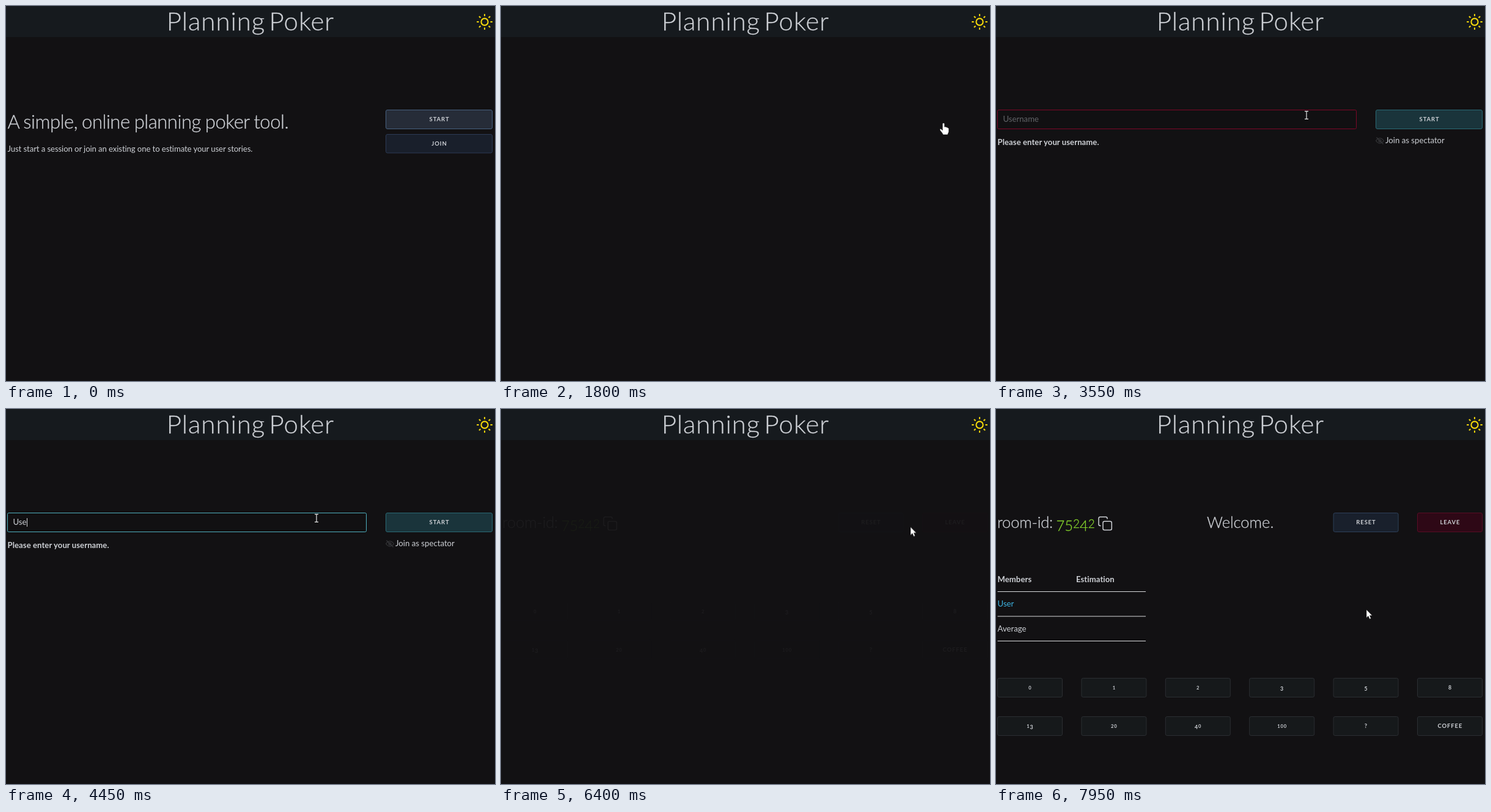
Animation, 800 px wide and 615 px high, one loop 8 s. Source, as an HTML page:

```html
<!DOCTYPE html>
<html lang="en">
<head>
<meta charset="utf-8">
<title>Planning Poker</title>
<style>
html, body { margin: 0; width: 100%; height: 100%; overflow: hidden; background: #121113; }
svg { display: block; width: 100vw; height: 100vh; }
text { font: 400 13.2px Lato, "Open Sans", sans-serif; fill: #cdd0d5; white-space: pre; }
.title, .lead, .sub { font-weight: 300; stroke: #cdd0d5; stroke-width: .3px; }
.title { font-size: 42px; letter-spacing: .95px; word-spacing: -6px; text-anchor: middle; }
.lead { font-size: 31px; letter-spacing: -.45px; word-spacing: -1px; }
.sub { font-size: 25.5px; }
.info { letter-spacing: -.11px; }
.bold { font-weight: 700; font-size: 13.1px; letter-spacing: .08px; }
.btn text { font-size: 9.5px; font-weight: 700; letter-spacing: .9px; text-anchor: middle; }
.line { fill: none; stroke: #cdd0d5; }

/* 1% of the loop is 80 ms */
.home, .form, .room, .shift, .cursor { animation: 8s linear infinite; }
.step, .caret, .field, .go, .go text, .join rect { animation: 8s step-end infinite; }

.home { animation-name: home; }
@keyframes home { 0%, 16.875% { opacity: 1 } 20%, 100% { opacity: 0 } }
.form { animation-name: form; }
@keyframes form { 0%, 22.5% { opacity: 0 } 28%, 73.75% { opacity: 1 } 76.875%, 100% { opacity: 0 } }
.room { animation-name: room; }
@keyframes room { 0%, 79.9% { opacity: 0 } 80% { opacity: .05 } 86%, 100% { opacity: 1 } }

.members { animation-name: members; }
@keyframes members { 0% { visibility: hidden } 81.5%, 100% { visibility: visible } }
.shift { animation-name: shift; animation-timing-function: step-end; }
@keyframes shift { 0% { transform: translateY(-125.5px) } 81.5%, 100% { transform: none } }

.join rect { animation-name: join; }
@keyframes join {
  0%, 15.5%, 100% { fill: #191f2b; stroke: #2c3a55 }
  13.1% { fill: #262c38; stroke: #46617f }
}
.go { animation-name: go; }
@keyframes go {
  0%, 70.8%, 100% { fill: #1d3c46; stroke: #43b4ca }
  38.125% { fill: #1a343b; stroke: #2a6a75 }
}
.go text { animation-name: goText; }
@keyframes goText { 0%, 70.8%, 100% { fill: #3db6d8 } 38.125% { fill: #cdd0d5 } }
.field { animation-name: field; }
@keyframes field { 0% { stroke: #7d0728 } 50%, 100% { stroke: #4fb0c0 } }

.hint { animation-name: hint; }
@keyframes hint { 0% { visibility: visible } 50%, 100% { visibility: hidden } }
.k1 { animation-name: k1; }
.k2 { animation-name: k2; }
.k3 { animation-name: k3; }
.k4 { animation-name: k4; }
@keyframes k1 { 0% { visibility: hidden } 50%, 100% { visibility: visible } }
@keyframes k2 { 0% { visibility: hidden } 53.125%, 100% { visibility: visible } }
@keyframes k3 { 0% { visibility: hidden } 55.625%, 100% { visibility: visible } }
@keyframes k4 { 0% { visibility: hidden } 57.5%, 100% { visibility: visible } }
.caret { animation-name: caret, blink; }
@keyframes caret {
  0% { transform: translateX(11px) }
  50% { transform: translateX(21px) }
  53.125% { transform: translateX(27px) }
  55.625% { transform: translateX(34px) }
  57.5%, 100% { transform: translateX(39px) }
}
@keyframes blink {
  0%, 44.375%, 63.75%, 73.125%, 100% { visibility: hidden }
  38.125%, 50%, 70% { visibility: visible }
}

.cursor { animation-name: move; }
@keyframes move {
  0% { transform: translate(700px, 625px) }
  .6% { transform: translate(700px, 608px); animation-timing-function: ease-out }
  10.625%, 11.875% { transform: translate(719px, 254px) }
  16.875%, 24.375% { transform: translate(724px, 192px) }
  31.875%, 33.125% { transform: translate(517px, 174px) }
  37.5%, 66.875% { transform: translate(508px, 179px) }
  72.5%, 91.25% { transform: translate(670px, 193.5px); animation-timing-function: ease-in-out }
  99.375%, 100% { transform: translate(606px, 329px) }
}
.arrow { animation-name: arrow; }
@keyframes arrow {
  0%, 15.4%, 28.1%, 69.7%, 80%, 100% { visibility: visible }
  13.1%, 16.1%, 29.2%, 70.8% { visibility: hidden }
}
.hand { animation-name: hand; }
@keyframes hand {
  0%, 15.4%, 28.1%, 80%, 100% { visibility: hidden }
  13.1%, 16.1%, 70.8% { visibility: visible }
}
.beam { animation-name: beam; }
@keyframes beam { 0%, 69.7%, 100% { visibility: hidden } 29.2% { visibility: visible } }
</style>
</head>
<body>
<svg viewBox="0 0 800 615" preserveAspectRatio="none">
  <rect width="800" height="615" fill="#121113"/>
  <rect width="800" height="51" fill="#161a1e"/>
  <text class="title" x="400" y="39.5">Planning Poker</text>
  <g id="sun" transform="translate(783 26)" fill="none" stroke="#f5d90a" stroke-width="2.1">
    <circle r="5.6"/>
  </g>

  <g class="home">
    <text class="lead" x="2.5" y="200.5">A simple, online planning poker tool.</text>
    <text class="info" x="2.5" y="239">Just start a session or join an existing one to estimate your user stories.</text>
    <g class="btn" fill="#262c38" stroke="#46617f">
      <rect x="621.5" y="170.5" width="174" height="31" rx="2.5"/>
      <text x="709" y="189.4" stroke="none">START</text>
    </g>
    <g class="btn join">
      <rect x="621.5" y="210.5" width="174" height="30.5" rx="2.5"/>
      <text x="709" y="229.2">JOIN</text>
    </g>
  </g>

  <g class="form">
    <rect class="field" x="2.5" y="170.5" width="587" height="31" rx="2" fill="#111012"/>
    <text class="step hint" x="11.4" y="190" style="fill:#626468">Username</text>
    <text x="11.4" y="190"><tspan class="step k1">U</tspan><tspan class="step k2">s</tspan><tspan class="step k3">e</tspan><tspan class="step k4">r</tspan></text>
    <rect class="caret" y="179" width="1" height="14" fill="#d8dade"/>
    <text class="bold" x="2.5" y="228">Please enter your username.</text>
    <g class="btn go">
      <rect x="621.5" y="170.5" width="174" height="31" rx="2.5"/>
      <text x="709" y="189.4" stroke="none">START</text>
    </g>
    <g fill="none" stroke="#37383b" stroke-width="1.1">
      <path d="M621.5 221Q628 212.5 634.5 221Q628 229.5 621.5 221ZM622.5 215.5L633.5 226.5"/>
      <circle cx="628" cy="221" r="2"/>
    </g>
    <text x="637" y="225">Join as spectator</text>
  </g>

  <g class="room">
    <text class="sub" x="2" y="195.3" letter-spacing="-.2">room-id:</text>
    <text class="sub" id="code" x="98.5" y="195.3" style="fill:#86d32c;stroke:#86d32c"></text>
    <g class="line" stroke-width="1.5">
      <rect x="175" y="184.3" width="14.3" height="14.3" rx="2.5"/>
      <path d="M171.5 191.5H170.5Q168 191.5 168 189V179.5Q168 177 170.5 177H179.5Q182 177 182 179.5V180.5"/>
    </g>
    <g id="top"></g>
    <g class="step members">
      <text class="sub" x="345" y="195.3">Welcome.</text>
      <text class="bold" x="2.5" y="283.7">Members</text>
      <text class="bold" x="131" y="283.7">Estimation</text>
      <text x="2.5" y="324.2" style="fill:#3db4e2">User</text>
      <text x="2.5" y="364.5">Average</text>
      <path d="M2.5 299.5H245M2.5 340H245M2.5 380.5H245" stroke="#d9dadd"/>
    </g>
    <g class="shift" id="cards"></g>
  </g>

  <g class="cursor">
    <path class="step arrow" d="M0 0V13.4L3 10.6L5.2 15.4L7.5 14.4L5.4 9.8H9.5Z" fill="#fff" stroke="#111" stroke-width=".5"/>
    <path class="step hand" d="M-1.7 1.6C-1.7 -.6 1.6 -.6 1.6 1.6V6.4C2.3 5.6 4.2 5.9 4.3 7.1C5.2 6.4 6.6 6.8 6.7 8C7.8 7.6 8.6 8.3 8.6 9.4V13.5C8.6 16 7 16.6 6.8 19H-.8C-1 17 -5.6 12.6 -6 11C-6.2 9.6 -4.4 9 -3.2 10.4L-1.7 12Z" fill="#fff" stroke="#111" stroke-width=".5"/>
    <path class="step beam" d="M-3 -6.3H3M0 -6.3V6.3M-3 6.3H3" fill="none" stroke="#e4e4e4" stroke-width="1.2"/>
  </g>
</svg>
<script>
const byId = id => document.getElementById(id);

// Old-style figures: 0-2 sit at x-height, 3 4 5 7 9 hang below the baseline.
function figures(text, size, low) {
  let drop = 0;
  return [...text].map(ch => {
    if (!/\d/.test(ch)) return ch;
    const small = "012".includes(ch);
    const next = "34579".includes(ch) ? size * 0.19 : 0;
    const dy = next - drop;
    drop = next;
    return `<tspan dy="${dy}" style="font-size:${size * (small ? low : 0.93)}px">${ch}</tspan>`;
  }).join("");
}

function button(col, y, label, fill, stroke) {
  const x = 2.5 + col * 137.4;
  return `<g class="btn"><rect x="${x}" y="${y}" width="106" height="31" rx="2.5" fill="${fill}" stroke="${stroke}"/>
    <text x="${x + 53.4}" y="${y + 18.9}">${figures(label, 9.5, 0.8)}</text></g>`;
}

byId("code").innerHTML = figures("75242", 25.5, 0.74);
byId("top").innerHTML =
  button(4, 170.5, "RESET", "#19202c", "#2e415a") +
  button(5, 170.5, "LEAVE", "#2e0816", "#590d25");
byId("cards").innerHTML = ["0", "1", "2", "3", "5", "8", "13", "20", "40", "100", "?", "COFFEE"]
  .map((label, i) => button(i % 6, i < 6 ? 441.5 : 504.5, label, "#16191b", "#2b2e32"))
  .join("");

for (let a = 0; a < 360; a += 45) {
  byId("sun").innerHTML += `<path d="M0 -9.4V-12.8" transform="rotate(${a})"/>`;
}
</script>
</body>
</html>
```
